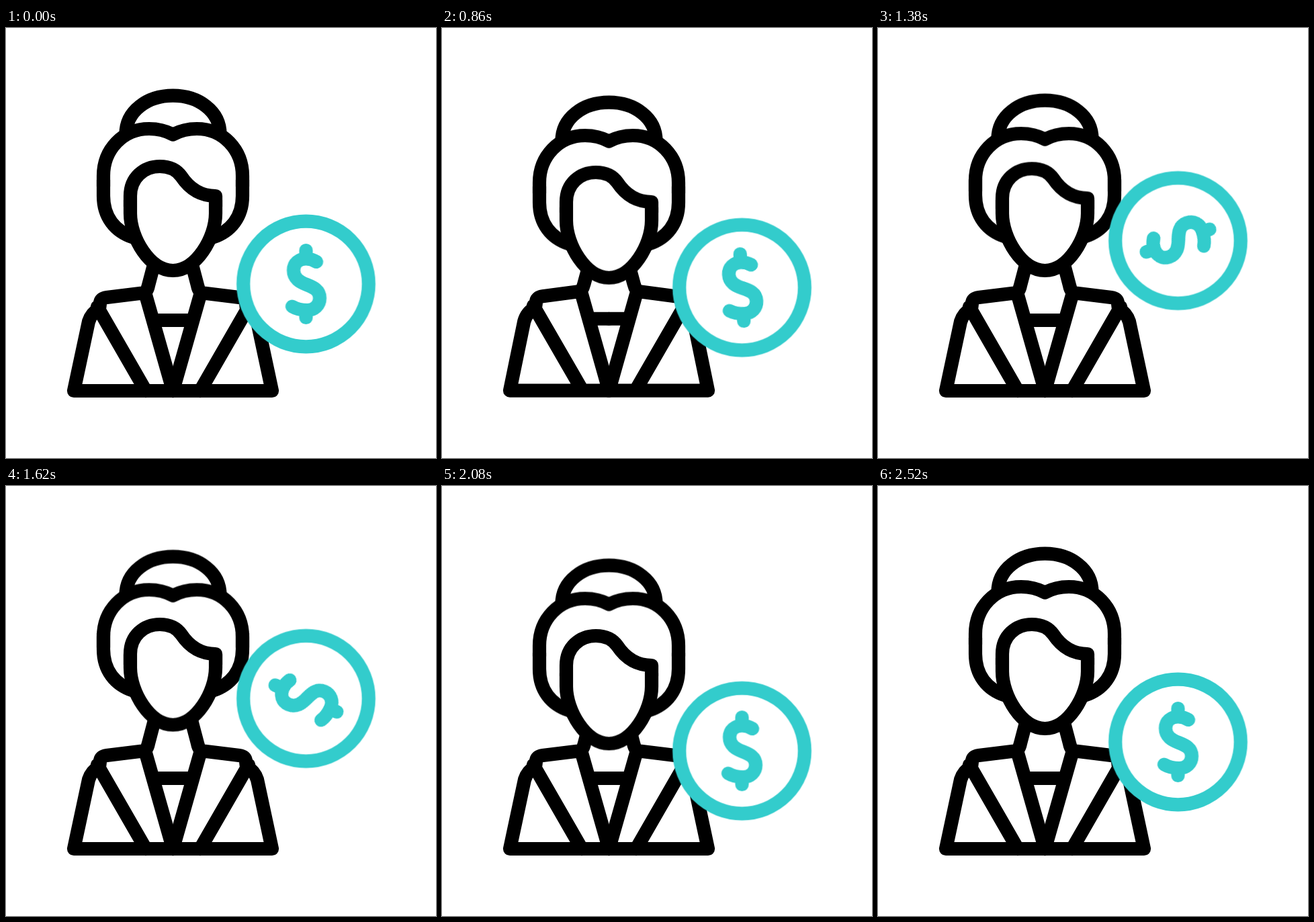
Animation, 640 px wide and 640 px high, one loop 2.8 s. Source, as an HTML page without scripts:

```html
<!DOCTYPE html>
<html lang="en">
<head>
<meta charset="utf-8">
<title>Businesswoman with coin</title>
<style>
  html, body { margin: 0; width: 100%; height: 100%; overflow: hidden; background: #fff; }
  svg { display: block; width: 100%; height: 100%; }

  path, circle { fill: none; stroke: #000; stroke-width: 20.2; stroke-linejoin: round; }
  .face path, .coin circle { fill: #fff; }
  .coin * { stroke: #3cc; }
  .coin path, .half { stroke-linecap: round; }

  .half, .part, .coin, .dollar {
    animation: 2.8s cubic-bezier(.333, 0, .667, 1) infinite;
  }
  .half { animation-name: breathe; }
  .part { animation-name: nod; }
  .coin { animation-name: toss; }
  .dollar { animation-name: spin; }

  /* Each head part travels by its own amounts, so the head stretches as it nods. */
  .crown  { --lift: -.5px;  --dip: 19px;   --hover: 4.5px;  --land: 17.5px; }
  .fringe { --lift: -2.5px; --dip: 18.5px; --hover: 0px;    --land: 17px; }
  .chin   { --lift: -6px;   --dip: 25px;   --hover: -5.5px; --land: 22.5px; }
  .locks  { --lift: -8px;   --dip: 25px;   --hover: -7px;   --land: 22.5px; }

  @keyframes nod {
    0%, 14.286%, 90%, 100% { transform: translateY(0); }
    22.857% { transform: translateY(var(--lift)); }
    37.857% { transform: translateY(var(--dip)); }
    53.571%, 64.643% { transform: translateY(var(--hover)); }
    74.643% { transform: translateY(var(--land)); }
  }

  @keyframes breathe {
    0%, 14.286%, 35%, 100% {
      d: path("M248.5 540H101L123 437C126 427 131 422 139 418L140 410C140 405 143 402 150 401L207 394L248.5 540M136 415L208 540M207 394Q211 389 212 383L222 345M224 435H248.5");
    }
    22.857% {
      d: path("M248.5 539H101L120 437C123 424 130 416 139 411L140 404C140 399 143 396 150 395L206 386L248.5 539M136 409L212 539M206 386Q208 380 210 375L221 337M222 427H248.5");
    }
  }

  @keyframes toss {
    0%, 14.286%, 90%, 100% { transform: translate(446.5px, 381px); }
    22.857% { transform: translate(446.5px, 404.3px); }
    50% { transform: translate(446.5px, 316.3px); }
    58.571% { transform: translate(446.5px, 316.3px); animation-timing-function: cubic-bezier(.6, 0, .8, .4); }
    65.714% { transform: translate(446.5px, 330.5px); animation-timing-function: cubic-bezier(.3, .2, .6, 1); }
    71.429% { transform: translate(446.5px, 407px); }
    77.857% { transform: translate(446.5px, 377px); }
  }

  @keyframes spin {
    0%, 28.571%, 68.393%, 100% { transform: rotate(0deg); }
    50% { transform: rotate(-110deg); }
  }
</style>
</head>
<body>
<svg viewBox="0 0 640 640">
  <path class="half"/>
  <g transform="matrix(-1 0 0 1 497 0)"><path class="half"/></g>

  <g class="part locks">
    <path d="M145 226V250C145 281 162 303 190 312M352 226V250C352 281 335 303 307 312"/>
  </g>
  <g class="part crown">
    <path d="M178.5 158C178.5 124 210 100.7 248.5 100.7S318.5 124 318.5 158"/>
    <path d="M145 236V220C145 181 174 150 213 150C224 150 236 152 248.5 158.5C261 152 273 150 284 150C323 150 352 181 352 220V236"/>
  </g>
  <g class="face">
    <path class="part chin" d="M185 256V276C185 312 214 361 248.500 361S312 312 312 276V256"/>
    <path class="part fringe" d="M185 266V250C185 223 205 206 229 206C244 206 254 211 261 221C273 239 290 250 312 250V266"/>
  </g>

  <g class="coin">
    <circle r="93.3"/>
    <g class="dollar">
      <path d="M0 -50V-38M0 50V39M15.5 -33C11 -36 6 -37.5 0 -37.5C-10 -37.5 -18.5 -31 -18.5 -20.5C-18.5 -8 -9 -3 1 1C11 5 20.5 9 20.5 21C20.5 32 12 39 2 39C-6 39 -14 37.5 -20.5 33.5"/>
    </g>
  </g>
</svg>
</body>
</html>
```
